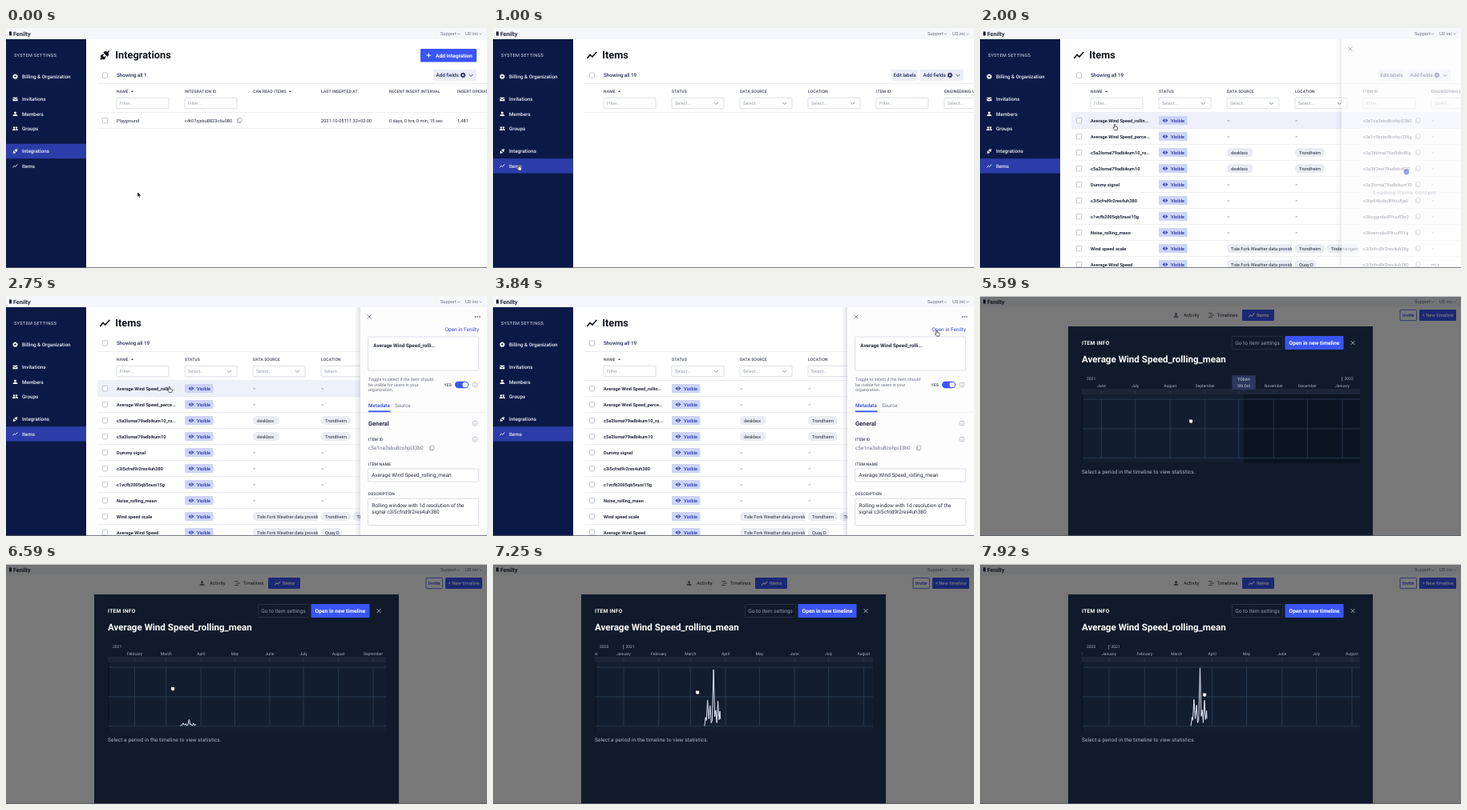
Recreate the animation shown at these times as an HTML page. Size 600 px wide and 300 px high, loop 8 s.

```html
<!DOCTYPE html>
<html lang="en">
<head>
<meta charset="utf-8">
<title>Item timeline walkthrough</title>
<style>
html, body { margin: 0; width: 100%; height: 100%; overflow: hidden; background: #fff; }
svg { display: block; width: 600px; height: 300px; }
text { font: 5.65px Roboto, sans-serif; fill: #262b3c; text-rendering: geometricPrecision; white-space: pre; }
.b { font-weight: 700; }
.m { font-weight: 500; }
.hd { font-size: 5px; font-weight: 500; letter-spacing: .13px; fill: #3a4052; }
.ph { fill: #9a9fae; }
.nav { font-size: 6.3px; font-weight: 500; fill: #eef0fa; }
.h1 { font-size: 12.8px; font-weight: 700; fill: #10131c; }
.btn { font-size: 6.3px; font-weight: 500; fill: #232c5c; }
.blue { fill: #2f48d8; }
.grey { fill: #6a7082; }
.white { fill: #fff; }
.mid { text-anchor: middle; }
.tick { font-size: 5px; fill: #a9b2c4; }
.line { stroke: #e4e6ed; stroke-width: .7; }
.box { fill: #fff; stroke: #cdd1db; stroke-width: .7; }
</style>
</head>
<body>
<svg id="stage" viewBox="0 0 600 300">
  <defs>
    <g id="gear" fill="none" stroke="currentColor">
      <circle r="1.9" stroke-width="1.5"/><circle r="2.9" stroke-width="1" stroke-dasharray="1.2 1.08"/>
    </g>
    <g id="mail" fill="currentColor"><path d="M-3-2.2h6v.5L0 .2l-3-1.9zM-3-.8 0 1.1 3-.8v3h-6z"/></g>
    <g id="user" fill="currentColor"><circle cy="-1.4" r="1.5"/><path d="M-3 2.8c0-3 6-3 6 0z"/></g>
    <g id="group" fill="currentColor">
      <circle cx="-1.4" cy="-1.2" r="1.2"/><circle cx="1.6" cy="-1.2" r="1.2"/>
      <path d="M-3.6 2.3c0-2.8 4.3-2.8 4.3 0zM1.2 2.3c0-1-.3-1.6-.6-2 1.2-.4 3 .2 3 2z"/>
    </g>
    <g id="plug" transform="rotate(45)" fill="currentColor">
      <path d="M-3.6-.9h7.2v-1.3a3.6 3.2 0 0 0-2.7-3V-7.6h-1.8v2.4a3.6 3.2 0 0 0-2.7 3z"/>
      <path d="M-3.6 2.3h1.1V.3h1.3v2h2.4v-2h1.3v2h1.1v.6a3.6 3 0 0 1-2.7 2.8v2H-.9v-2a3.6 3 0 0 1-2.7-2.8z"/>
    </g>
    <g id="trend" fill="none" stroke="currentColor" stroke-width="1.7">
      <path d="M-6 4-2.2-.6.6 2 6-4"/>
    </g>
    <g id="eye"><path d="M-3.4 0Q0-4.4 3.4 0 0 4.4-3.4 0z" fill="currentColor"/><circle r="1.5" fill="#cdd4fb"/><circle r=".8" fill="currentColor"/></g>
    <g id="copy" fill="none" stroke="currentColor" stroke-width=".6">
      <rect x="-1.4" y="-3" width="4.2" height="5" rx=".6"/><path d="M-1.4-1.6h-1.2v4.6h4V2"/>
    </g>
    <g id="chev" fill="none" stroke="currentColor" stroke-width=".9"><path d="M-2.4-1.2 0 1.2l2.4-2.4"/></g>
    <g id="cross" fill="none" stroke="currentColor" stroke-width=".8"><path d="M-2.5-2.5l5 5m0-5-5 5"/></g>
    <g id="info" fill="none" stroke="currentColor" stroke-width=".5"><circle r="3"/><path d="M0-.4v2M0-1.7v.6" stroke-width=".7"/></g>
    <linearGradient id="shade"><stop stop-color="#202a50" stop-opacity="0"/><stop offset="1" stop-color="#202a50" stop-opacity=".13"/></linearGradient>
    <clipPath id="source"><rect x="308" y="100" width="81" height="200"/></clipPath>
    <clipPath id="plot"><rect x="127" y="96" width="347" height="114"/></clipPath>
  </defs>
  <g id="admin"></g>
  <g id="app"></g>
  <g id="cursor" stroke-linejoin="round">
    <path id="arrow" d="M0 0v6.4l1.5-1.3 1 2.2 1.1-.5-1-2.1h2z" fill="#000" stroke="#fff" stroke-width=".5"/>
    <path id="hand" d="M-.6-.4a.7.7 0 0 1 1.4 0v2l2.4.6q.8.3.6 1.2l-.6 2.8H-.2l-2-2.8q.2-.8 1-.4l.6.5z" fill="#fff" stroke="#000" stroke-width=".6"/>
    <path id="grab" d="M-2.2-1.2q.7-1.2 1.3-.3.6-1.1 1.3-.2.8-.8 1.2.3.9-.3.9.8l-.3 2.4-.7 1.2h-2.4L-2.6.8q-.2-.9.6-.6z" fill="#fff" stroke="#000" stroke-width=".5"/>
  </g>
  <rect y="299.2" width="600" height=".8" fill="#555a66"/>
</svg>
<script>
const $ = id => document.getElementById(id);
const text = (x, y, s, cls = '', more = '') => `<text x="${x}" y="${y}" class="${cls}" ${more}>${s}</text>`;
const rect = (x, y, w, h, fill, more = '') => `<rect x="${x}" y="${y}" width="${w}" height="${h}" fill="${fill}" ${more}/>`;
const box = (x, y, w, h) => `<rect x="${x}" y="${y}" width="${w}" height="${h}" class="box" rx="1"/>`;
const hline = (x, y, x2) => `<path d="M${x} ${y}H${x2}" class="line"/>`;
const icon = (id, x, y, color, s = 1) => `<g transform="translate(${x} ${y}) scale(${s})" color="${color}"><use href="#${id}"/></g>`;
const group = (id, ...parts) => `<g id="${id}">${parts.join('')}</g>`;

const BLUE = '#3a55f5', COLS = [138, 223, 308, 393, 478, 563];

const topbar = () => rect(0, 0, 600, 14, '#f6f7fb') + rect(4, 4.5, 3, 5, '#20253a') +
  text(9, 9.6, 'Fenilty', 'b', 'style="font-size:7.2px"') +
  text(542, 9.2, 'Support', 'grey') + icon('chev', 564.5, 7.4, '#6a7082', .7) +
  text(573, 9.2, 'UD inc', 'grey') + icon('chev', 592, 7.4, '#6a7082', .7);

const menu = [
  ['gear', 60.7, 'Billing &amp; Organization', 1], ['mail', 89, 'Invitations', 1], ['user', 107.3, 'Members', 1],
  ['group', 125.7, 'Groups', 1], ['plug', 154, 'Integrations', .5], ['trend', 172.4, 'Items', .5]
];
const sidebar = rect(0, 14, 100, 286, '#0a1946') + `<rect id="active" width="100" height="18.4" fill="#2c3da9"/>` +
  text(10, 36, 'SYSTEM SETTINGS', '', 'style="font-size:5.6px;letter-spacing:.3px;fill:#dfe3f3"') +
  menu.map(([id, y, s, k]) => icon(id, 11.5, y, '#fff', k) + text(20, y + 2.2, s, 'nav')).join('');

const checkbox = y => `<rect x="120.3" y="${y - 3.2}" width="6.4" height="6.4" rx="1" fill="#fff" stroke="#a9aebb" stroke-width=".7"/>`;
const sort = x => `<path d="M${x - 1.6} 80h3.2l-1.6-2z" fill="#4a5063"/>`;
const filter = x => box(x, 87.3, 65, 13.4) + text(x + 4, 96, 'Filter...', 'ph');
const select = x => box(x, 87.3, 65, 13.4) + text(x + 4, 96, 'Select...', 'ph') + icon('chev', x + 55.5, 94.2, '#7b8194');
const addFields = x => rect(x, 52, 587 - x, 14, '#eceef7', 'rx="1"') + text(536.5, 61.2, 'Add fields', 'btn') +
  icon('gear', 570, 59, '#232c5c') + icon('chev', 580, 59.2, '#232c5c');
const tableTop = (title, glyph, count, heads) => icon(glyph, 123.3, 34, '#10131c') + text(136.3, 38.4, title, 'h1') +
  checkbox(59) + text(138, 61.2, 'Showing all ' + count, 'btn') + hline(114, 69.5, 600) + hline(114, 105.5, 600) +
  heads.map((s, i) => text(COLS[i], 81.3, s, 'hd')).join('') + sort(157.5);

const integrations = group('integrations',
  tableTop('Integrations', 'plug', 1, ['NAME', 'INTEGRATION ID', 'CAN READ ITEMS', 'LAST INSERTED AT', 'RECENT INSERT INTERVAL', 'INSERT OPERATIONS']),
  sort(354.5), filter(138), filter(223), addFields(533),
  rect(517, 26, 70, 16.4, BLUE, 'rx="1"'), '<path d="M527.3 31.5v5.4m-2.7-2.7h5.4" stroke="#fff"/>',
  text(536, 36.5, 'Add integration', 'b white', 'style="font-size:6.6px"'),
  checkbox(115.6),
  ['Playground', 'c4t07sjsbu8823c6u080', '', '2021-10-05T11:32+02:00', '0 days, 0 hrs, 0 min, 15 sec', '1,481']
    .map((s, i) => text(COLS[i], 117.6, s)).join(''),
  icon('copy', 291, 115.6, '#8b91a2'), hline(114, 125.6, 600));

const STATION = 'Tide Fork Weather data provide';
const rows = [
  ['Average Wind Speed_rollin...', 'c5e1na3sbu8cohpi33b0'],
  ['Average Wind Speed_perce...', 'c5e1n9bsbu8cohpi336g'],
  ['c5a2lomai79adbikum10_ro...', 'c5a3ddmai79adbikv8fg', 'deskbox', 'Trondheim'],
  ['c5a2lomai79adbikum10', 'c5a3d2eai79adbikv820', 'deskbox', 'Trondheim'],
  ['Dummy signal', 'c5a2lomai79adbikum10'],
  ['c3i5cfnd9r2res4uh380', 'c56p64bsbu89tvuflja0'],
  ['c1vcfb2005qb5nusi15g', 'c56oggrsbu89tvufl3o0'],
  ['Noise_rolling_mean', 'c56oenrsbu89tvufl11g'],
  ['Wind speed scale', 'c3i5cfnd9r2res4uh38g', STATION, 'Trondheim', 'Tindelvangen'],
  ['Average Wind Speed', 'c3i5cfnd9r2res4uh380', STATION, 'Quay D', '', 'm/s']
];
const chip = (x, y, s, w) => rect(x, y - 5.6, w, 11.2, '#eaecf3', 'rx="5"') + text(x + 5, y + 2, s);
const row = ([name, id, source, place, place2, unit = '–'], i) => {
  const y = 115.6 + 20 * i;
  return checkbox(y) + text(138, y + 2, name, 'b') +
    rect(223, y - 5.5, 35.5, 11, '#cdd4fb', 'rx="1"') + icon('eye', 231, y, '#2436a0') + text(238, y + 2, 'Visible', 'm', 'style="fill:#2436a0"') +
    (source ? `<g clip-path="url(#source)">${chip(308, y, source, source === STATION ? 90 : 32.5)}</g>` : text(308, y + 2, '–')) +
    (place ? chip(393, y, place, place.length > 6 ? 37 : 26) : text(393, y + 2, '–')) +
    (place2 ? chip(432.5, y, place2, 41) : '') +
    text(478, y + 2, id) + icon('copy', 546, y, '#8b91a2') + text(563, y + 2, unit) + hline(114, y + 10, 600);
};
const items = group('items',
  tableTop('Items', 'trend', 19, ['NAME', 'STATUS', 'DATA SOURCE', 'LOCATION', 'ITEM ID', 'ENGINEERING UNIT']),
  filter(138), select(223), select(308), select(393), filter(478), select(563),
  rect(496.5, 52, 33.5, 14, '#eceef7', 'rx="1"'), text(499.5, 61.2, 'Edit labels', 'btn', 'style="font-size:6.1px"'), addFields(532.5),
  group('rows', '<rect id="hover" x="114" width="486" height="20" fill="#eef1fc"/>', rows.map(row).join('')));

const size = px => `style="font-size:${px}px"`;
const detail = group('detail',
  [585.5, 588.2, 590.9].map(x => `<circle cx="${x}" cy="26" r=".8" fill="#262b3c"/>`).join(''),
  text(590, 44.3, 'Open in Fenilty', 'blue', size(6.5) + ' text-anchor="end"'),
  box(451.7, 51, 138, 42), text(458.3, 64, 'Average Wind Speed_rolli...', 'b', size(6.3)),
  ['Toggle to select if the item should', 'be visible for users in your', 'organization.'].map((s, i) => text(452, 106 + 6.6 * i, s, 'grey', size(5.4))).join(''),
  text(546.5, 113, 'YES', 'hd'), rect(560, 106.8, 17, 8.4, BLUE, 'rx="4.2"'), '<circle cx="572.7" cy="111" r="3.3" fill="#fff"/>',
  [111, 159, 179].map(y => icon('info', 585, y, '#8b91a2')).join(''),
  text(452, 138.8, 'Metadata', 'm blue', size(6.3)), text(485, 138.8, 'Source', 'grey', size(6.3)),
  hline(442, 145.2, 600), rect(452, 143.4, 27.5, 1.8, BLUE),
  text(452, 161.8, 'General', 'b', size(7.4)),
  text(452, 181, 'ITEM ID', 'hd'), text(452, 192.4, 'c5e1na3sbu8cohpi33b0', 'grey', size(6.4)), icon('copy', 531, 190, '#8b91a2'),
  text(452, 211.7, 'ITEM NAME', 'hd'), box(451.7, 216, 138, 16), text(456.3, 226.3, 'Average Wind Speed_rolling_mean', '', size(6.5)),
  text(452, 249, 'DESCRIPTION', 'hd'), box(451.7, 253.3, 138, 33.3),
  text(456.3, 264.2, 'Rolling window with 1d resolution of the', '', size(6.5)), text(456.3, 272.4, 'signal c3i5cfnd9r2res4uh380', '', size(6.5)));
const panel = group('panel',
  rect(435, 14, 7, 286, 'url(#shade)'), rect(442, 14, 200, 286, '#fdfdfe'), icon('cross', 453, 26, '#6a7082'),
  group('loading', `<circle id="dot" cy="180" r="3.4" fill="#5468ec"/>`,
    text(521, 208, 'Loading items content', 'mid', 'style="font-size:6.6px;letter-spacing:.65px;fill:#a4a9b6"')),
  detail);

$('admin').innerHTML = rect(0, 0, 600, 300, '#fff') + integrations + items + panel + topbar() + sidebar;

$('app').innerHTML = rect(0, 0, 600, 300, '#fff') + topbar() +
  icon('user', 244.5, 24, '#596074') + text(254, 26.2, 'Activity', '', size(6)) +
  '<path d="M285 21.6h5m-3 2.4h5m-7 2.4h5" stroke="#596074" stroke-width=".9"/>' + text(295.5, 26.2, 'Timelines', '', size(6)) +
  rect(327, 17, 40, 14, BLUE, 'rx="1"') + icon('trend', 338.7, 24, '#fff', .6) + text(345, 26.2, 'Items', 'b white', size(6)) +
  `<rect x="524" y="17.4" width="20.5" height="13.2" rx="1" fill="#fff" stroke="${BLUE}" stroke-width=".8"/>` + text(534.2, 26.2, 'Invite', 'm blue mid', size(5.9)) +
  rect(548, 17, 46, 14, BLUE, 'rx="1"') + text(571, 26.2, '+ New timeline', 'm white mid', size(5.9)) +
  group('modal',
    rect(0, 0, 600, 300, '#000', 'opacity=".53"'), rect(0, 0, 600, .8, '#e4e4e6'), rect(110, 38, 380, 262, '#101a2a'),
    text(127, 61, 'ITEM INFO', 'b white', 'style="font-size:6.6px;letter-spacing:.3px"'),
    `<rect x="314.4" y="50.4" width="63.2" height="16.2" rx="1" fill="none" stroke="#2c374a" stroke-width=".8"/>`,
    text(346, 61, 'Go to item settings', 'mid', 'style="font-size:6.6px;fill:#949cad"'),
    rect(380.5, 50, 73, 17, BLUE, 'rx="1"'), text(417, 61, 'Open in new timeline', 'b white mid', size(6.7)),
    icon('cross', 465, 58.6, '#c5cad6'),
    text(127, 83.3, 'Average Wind Speed_rolling_mean', 'b white', size(11.6)),
    '<g id="chart" clip-path="url(#plot)"></g>',
    text(127, 221.6, 'Select a period in the timeline to view statistics.', '', 'style="font-size:6.5px;letter-spacing:.09px;fill:#b4bbc9"'));

// Keyed values: [time, value, ...], eased between neighbours.
const clamp = v => Math.min(1, Math.max(0, v));
function key(keys, t) {
  const i = keys.findIndex(k => k[0] > t);
  if (i < 0) return keys.at(-1).slice(1);
  const [a, b] = [keys[i - 1], keys[i]], u = (t - a[0]) / (b[0] - a[0]), e = u * u * (3 - 2 * u);
  return a.slice(1).map((v, j) => v + (b[j + 1] - v) * e);
}
const POINTER = [
  [0, 164, 205], [200, 164, 205], [700, 32, 172], [1000, 32, 172], [1500, 168, 121.5], [2600, 168, 121.5],
  [3400, 553.5, 44], [4080, 553.5, 44], [4580, 321, 156.5], [5250, 321, 156.5], [5560, 263, 156], [5620, 263, 156],
  [5900, 352, 156], [6100, 230, 155], [6380, 319, 156], [6560, 208, 155.5], [6700, 208, 155.5], [6950, 255, 160],
  [7500, 255, 160], [7800, 280, 163]
];
const ZOOM = [[0, Math.log(27.15)], [4750, Math.log(27.15)], [5330, Math.log(1.404)], [7100, Math.log(1.404)], [7500, Math.log(1.429)]];
const PAN = [[0, 0], [5620, 0], [5900, 88.7], [6100, 88.7], [6380, 177.4], [6700, 177.4], [6950, 224.4], [7100, 224.4], [7500, 228.3]];
const GAIN = [[0, .11], [6840, .11], [7300, 1]];

const CURVE = [
  [71.4, 0], [72.4, 11], [73.1, 7], [74.1, 33], [75.2, 9], [76.4, 26], [77.3, 4], [78.2, 7], [79.4, 72.5],
  [80.5, 12], [81.3, 20], [82.2, 4], [83.3, 32], [84.2, 8], [85.1, 19], [85.4, 9]
];
const NOW = 277.45, DAY = 864e5, YEAR0 = Date.UTC(2021, 0, 1);
const month = (d, len) => new Date(YEAR0 + d * DAY).toLocaleString('en', { month: len, timeZone: 'UTC' });
const date = d => new Date(YEAR0 + d * DAY).getUTCDate();
const nth = n => n + (n > 3 && n < 21 ? 'th' : ['th', 'st', 'nd', 'rd'][n % 10] || 'th');

function ticks(k) {
  if (k < 4) return Array.from({ length: 19 }, (_, m) => {
    const d = (Date.UTC(2021, m - 3, 1) - YEAR0) / DAY;
    return [d, month(d, 'long')];
  });
  const step = k > 12 ? 2 : 7;
  return Array.from({ length: 21 }, (_, i) => {
    const d = 265 + step * (i - 9);
    return [d, date(d) + ' ' + month(d, 'short')];
  });
}

function drawChart(t, cx) {
  const k = Math.exp(key(ZOOM, t)[0]), gain = key(GAIN, t)[0];
  const x0 = 320.9 - 271.65 * k + key(PAN, t)[0], px = d => +(x0 + d * k).toFixed(2), now = px(NOW);
  let s = rect(127, 116, 347, 7, '#1b2537') + rect(127, 123, 347, 86, '#121e30') + rect(127, 123, 2, 86, '#0c1523');
  if (now < 474) s += rect(now, 123, 474 - now, 86, '#0b1421');
  s += '<path d="M129 129H474M127 166H474M127 202.6H474" stroke="#2b4059" stroke-width=".8"/>';
  for (const [d, label] of ticks(k)) {
    const x = px(d);
    if (x < 100 || x > 500) continue;
    s += `<path d="M${x} 129V202.6M${x} 118V122" stroke="#2b4059" stroke-width=".8"/>`;
    if (k > 4 || Math.abs(x - now) > 20) s += text(x, 114.2, label, 'tick mid');
  }
  [0, 365].forEach((d, i) => {
    const x = px(d);
    if (x > 127 && x < 474) s += rect(x - .7, 101, .8, 5.5, '#8d96a8') + text(x + 2.5, 105.4, 2021 + i, 'tick');
  });
  s += text(133, 105.4, px(0) > 133 ? 2020 : 2021, 'tick');
  s += `<path d="M${CURVE.map(([d, h]) => px(d) + ' ' + (202.4 - h * gain).toFixed(2)).join('L')}" fill="none" stroke="#e3e9fb" stroke-width="1" stroke-linejoin="round"/>`;
  if (now < 490) {
    s += rect(now - 14.7, 99.3, 29.4, 17.5, '#2c385e') + `<path d="M${now - 2.5} 116.8h5l-2.5 2.8z" fill="#2c385e"/>`;
    s += k > 10 ? text(now, 114.2, '11:30', 'tick mid white')
      : text(now, 105.8, 'TODAY', 'tick b mid white') + text(now, 114.2, '5th Oct', 'tick m mid white');
  }
  if (t > 4480 && t < 5400) {
    const d = Math.floor((cx - x0) / k);
    s += rect(cx - .4, 112, .8, 92, '#7f8aa0') + rect(cx - 16.4, 104, 32.8, 8.4, '#0a111c', 'stroke="#3a465c" stroke-width=".5"') +
      text(cx, 110.2, nth(date(d)) + ' ' + month(d, 'short'), 'm mid white');
  }
  $('chart').innerHTML = s;
}

const show = (id, on) => $(id).setAttribute('display', on ? 'inline' : 'none');
const move = (id, x, y) => $(id).setAttribute('transform', `translate(${x.toFixed(2)} ${y.toFixed(2)})`);

function render(t) {
  const [x, y] = key(POINTER, t);
  const onItems = t >= 740, inApp = t >= 3990, hasPanel = t > 1840;
  show('admin', !inApp);
  show('app', inApp);
  show('integrations', !onItems);
  show('items', onItems);
  show('rows', t >= 1080);
  move('active', 0, onItems ? 163.2 : 144.8);

  const p = clamp((t - 1834) / 333);
  show('panel', hasPanel);
  move('panel', 36 * (1 - p) ** 2, 0);
  $('panel').setAttribute('opacity', clamp(1.2 * p));
  show('loading', t < 2410);
  show('detail', t >= 2410);
  $('dot').setAttribute('cx', 521 + 12 * Math.sin((t - 1975) / 160));

  const overRow = onItems && !inApp && t >= 1080 && y > 105.6 && x > 114 && x < (hasPanel ? 442 : 600);
  show('hover', overRow);
  $('hover').setAttribute('y', 105.6 + 20 * Math.floor((y - 105.6) / 20));

  $('modal').setAttribute('opacity', clamp((t - 4000) / 200));
  if (inApp) drawChart(t, x);

  const overLink = x < 100 || (x > 545 && y < 50 && !inApp);
  const overPlot = inApp && x > 127 && x < 474 && y > 96;
  show('grab', overPlot);
  show('hand', !overPlot && (overRow || overLink));
  show('arrow', !overPlot && !overRow && !overLink);
  move('cursor', x, y);
}

function tick() {
  const step = Math.floor((performance.now() % 8000) * .012 + 1e-6);
  render(step / .012);
  requestAnimationFrame(tick);
}
tick();
</script>
</body>
</html>
```
